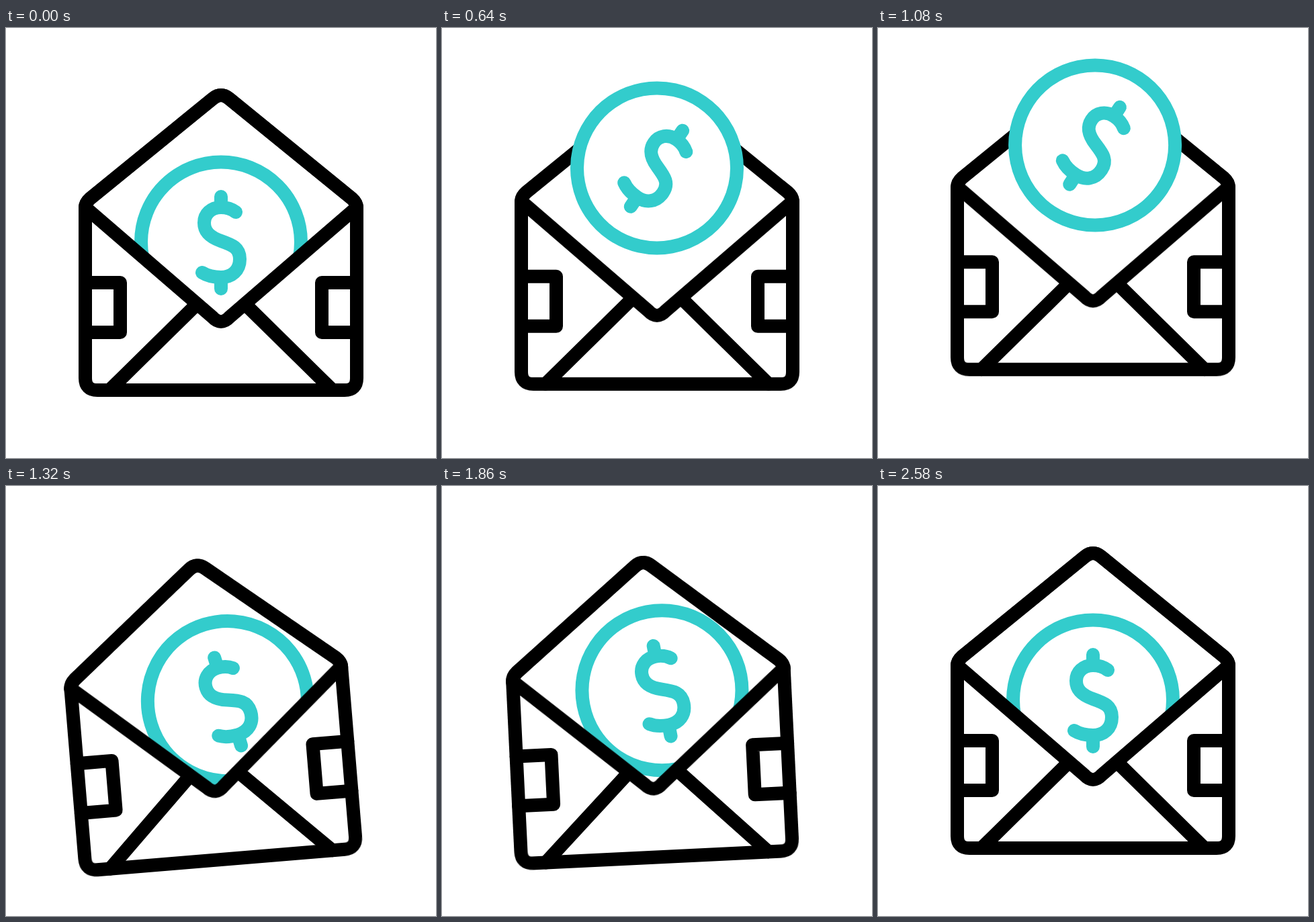
Recreate the animation shown at these times as an HTML page. Size 640 by 640 pixels, loop 2.68 s.

```html
<!DOCTYPE html>
<html lang="en">
<head>
<meta charset="utf-8">
<title>Coin and envelope</title>
<style>
  html, body { margin: 0; width: 100%; height: 100%; overflow: hidden; background: #fff; }
  svg { display: block; width: 100vw; height: 100vh; }

  .line { fill: none; stroke: #000; stroke-width: 20; stroke-linecap: round; stroke-linejoin: round; }
  .teal { stroke: #33cccc; }
  .white { fill: #fff; }

  .env, .env > g, .lift, .swing, .rim {
    animation: 2680ms cubic-bezier(.37, 0, .63, 1) infinite;
  }
  .env { animation-name: bounce; }
  .env > g { animation-name: rock; transform-origin: 320px 537px; }
  .lift { animation-name: lift; }
  .swing { animation-name: swing; transform-origin: 320px 318.5px; }
  .rim { animation-name: rim; animation-timing-function: step-end; }

  @keyframes bounce {
    0%, 7.46% { translate: 0 0; }
    17.05% { translate: 0 14px; }
    34.14% { translate: 0 -52.7px; }
    50.56% { translate: 0 18px; }
    59.33% { translate: 0 -4px; }
    69.03% { translate: 0 13.5px; }
    78.73%, 100% { translate: 0 0; }
  }
  @keyframes rock {
    0%, 42.16% { rotate: 0deg; }
    50.56% { rotate: -5deg; }
    59.33% { rotate: 4.85deg; }
    69.03% { rotate: -2.8deg; }
    78.73% { rotate: 2deg; }
    96.27%, 100% { rotate: 0deg; }
  }
  /* the coin leaps out, then falls with constant acceleration */
  @keyframes lift {
    0%, 10.26% { translate: 0 0; }
    34.14% { translate: 0 -179.5px; animation-timing-function: cubic-bezier(.33, 0, .67, .33); }
    48.13% { translate: 0 2px; }
    59.33% { translate: 0 -16.5px; }
    69.03% { translate: 0 -14.5px; animation-timing-function: linear; }
    83.58% { translate: 0 -7.5px; animation-timing-function: linear; }
    96.27%, 100% { translate: 0 0; }
  }
  @keyframes swing {
    0%, 10.26% { translate: 0 0; rotate: 0deg; }
    34.14% { translate: 0 0; rotate: 56deg; }
    50.56% { translate: 10px 0; rotate: -18deg; }
    59.33% { translate: -17px 0; rotate: 15.5deg; }
    69.03% { translate: 7.5px 0; rotate: -11deg; }
    78.73% { translate: -9.7px 0; rotate: 12deg; }
    96.27%, 100% { translate: 0 0; rotate: 0deg; }
  }
  /* the flap edge lies over the coin only while the coin is inside */
  @keyframes rim {
    0% { opacity: 1; }
    14.93% { opacity: 0; }
    46.64%, 100% { opacity: 1; }
  }
</style>
</head>
<body>
<svg viewBox="0 0 640 640">
  <defs>
    <path id="flap" class="line" d="M118 268Q118 260 125 254L308 105Q320 95 332 105L515 254Q522 260 522 268"/>
    <g id="side" class="line">
      <path d="M154 539L278 417"/>
      <path d="M118 379H170V453H118"/>
    </g>
  </defs>

  <g class="env"><g><use href="#flap"/></g></g>

  <g class="lift">
    <g class="swing">
      <circle class="white" cx="320" cy="318.5" r="119"/>
      <circle class="line teal" cx="320" cy="318.5" r="119"/>
      <path class="line teal" d="M342 274Q333 267 320 267C305 267 295 277 295 290C295 303 303 311 320 317C337 323 348 327 348 344C348 361 336 371 320 371Q303 371 292 364M320 251V267M320 371V388"/>
    </g>
  </g>

  <g class="env">
    <g>
      <path class="white" d="M118 268L320 440L522 268V521Q522 539 504 539H136Q118 539 118 521Z"/>
      <use class="rim" href="#flap"/>
      <use href="#side"/>
      <use href="#side" transform="matrix(-1 0 0 1 640 0)"/>
      <path class="line" d="M118 267L307 430Q320 444 333 430L522 267V521Q522 539 504 539H136Q118 539 118 521Z"/>
    </g>
  </g>
</svg>
</body>
</html>
```
